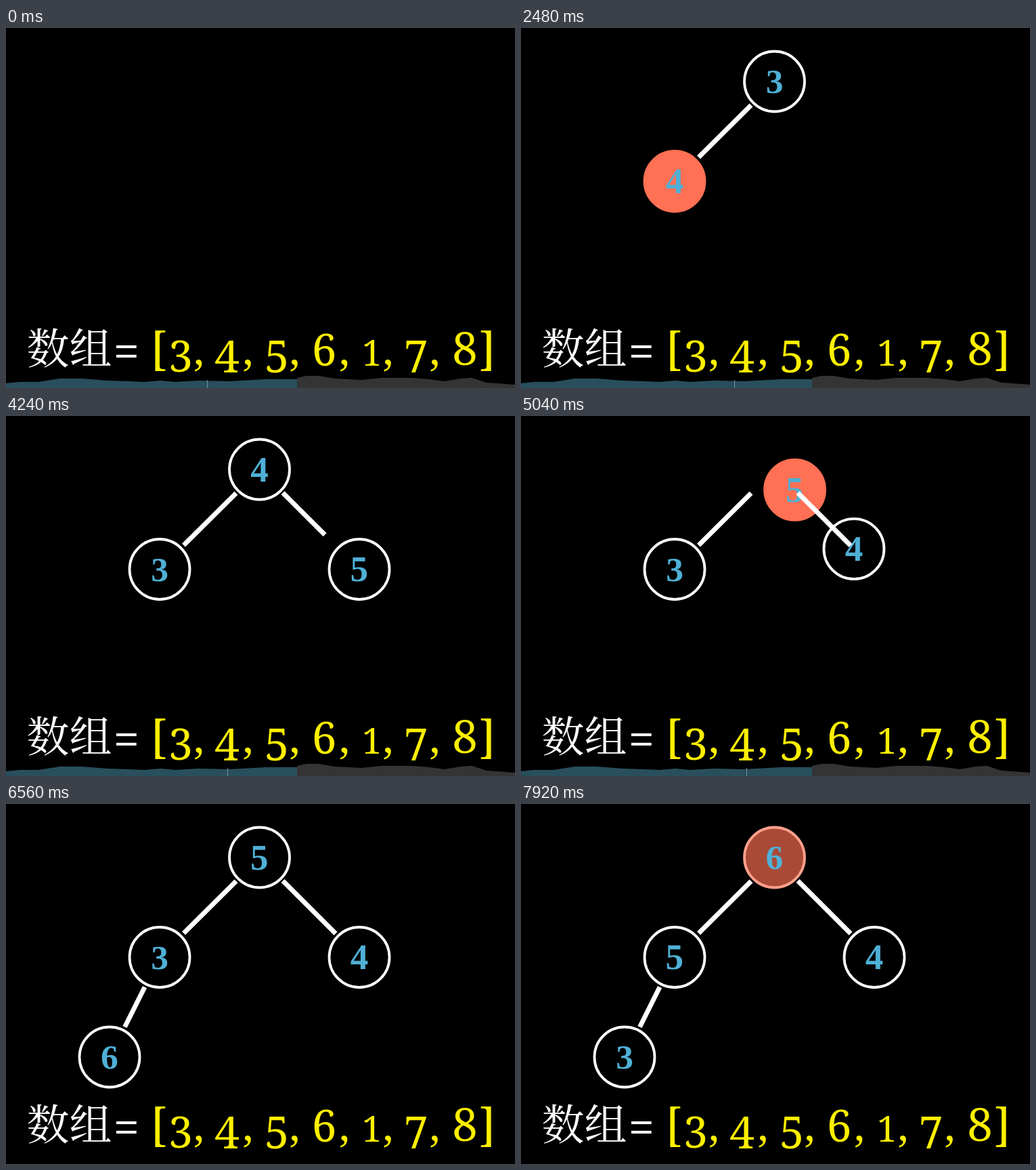
Animation, 752 px wide and 532 px high, one loop 8000 ms. Source, as an HTML page with a canvas:

```html
<!DOCTYPE html>
<html lang="zh">
<head>
<meta charset="utf-8">
<title>Heap insertion</title>
<style>
html, body { margin: 0; width: 100%; height: 100%; overflow: hidden; background: #000; }
canvas { display: block; }
</style>
</head>
<body>
<canvas id="stage" width="752" height="532"></canvas>
<script>
const ctx = document.getElementById('stage').getContext('2d');

const LOOP = 8000, TICK = 80;
const START = 871, STEP = 800 / 3;      // every action takes one step
const BAR_END = 6480;

const SERIF = '"Noto Serif", serif';
const NODE_FONT = '"Liberation Serif", "Times New Roman", serif';
const CJK = '"Noto Serif CJK SC", "Noto Sans CJK SC", "Noto Sans CJK", sans-serif';
const YELLOW = '#fff000', BLUE = '#4fb0d6';

const ROOT = [374.5, 79], LEFT = [227, 226.5], RIGHT = [522, 226.5], LEAF = [153, 374];

// from: place in the array; moves: [step, destination]; red: [step on, step off]
const nodes = [
  { digit: '3', from: [259, 485], home: ROOT, insert: 0, moves: [[7, LEFT], [24, LEAF]] },
  { digit: '4', from: [327, 485], home: LEFT, insert: 2, moves: [[7, ROOT], [15, RIGHT]], red: [5, 8] },
  { digit: '5', from: [400, 486], home: RIGHT, insert: 11, moves: [[15, ROOT], [25, LEFT]], red: [14, 16] },
  { digit: '6', from: [471, 476], home: LEAF, insert: 19, moves: [[24, LEFT], [25, ROOT]], red: [22, 26] },
];

const edges = [
  { step: 3, a: [340, 114], b: [262.5, 191] },
  { step: 12, a: [409, 113.5], b: [487, 191.5] },
  { step: 20, a: [205, 270.5], b: [175.5, 329.5] },
];

// character, ink centre x, ink top, ink bottom
const arrayText = [
  ['[', 228, 448, 508], ['3', 258, 461, 508.5], ['4', 326.5, 461, 508.5],
  ['5', 399.5, 462, 510], ['6', 470.5, 451, 499.5], ['1', 540, 461, 499],
  ['7', 606, 461, 508.5], ['8', 678, 449.5, 499], [']', 709, 448, 508],
];
const commas = [284.5, 357, 426, 499.5, 564, 633];

const lerp = (a, b, p) => a + (b - a) * p;
const lerpPoint = (a, b, p) => [lerp(a[0], b[0], p), lerp(a[1], b[1], p)];
const sigmoid = x => 1 / (1 + Math.exp(-x));

function smooth(x) {
  const low = sigmoid(-5);
  const p = Math.max(0, Math.min(1, x));
  return (sigmoid(10 * (p - 0.5)) - low) / (1 - 2 * low);
}

const progress = (time, step) => smooth((time - START) / STEP - step);

// Draws one character at the size that fills the given ink height.
function drawInk(char, x, top, bottom, family, weight = 400) {
  ctx.font = `${weight} 100px ${family}`;
  const probe = ctx.measureText(char);
  const size = 100 * (bottom - top) / (probe.actualBoundingBoxAscent + probe.actualBoundingBoxDescent);
  const k = size / 100;
  ctx.font = `${weight} ${size}px ${family}`;
  ctx.fillText(char,
    x - k * (probe.actualBoundingBoxRight - probe.actualBoundingBoxLeft) / 2,
    bottom - k * probe.actualBoundingBoxDescent);
}

function drawArray() {
  ctx.fillStyle = '#fff';
  ctx.font = `200 63px ${CJK}`;
  ctx.fillText('数', 30.5, 496);
  ctx.fillText('组', 93.5, 496);
  drawInk('=', 178, 469, 487, SERIF);
  ctx.fillStyle = YELLOW;
  for (const [char, x, top, bottom] of arrayText) drawInk(char, x, top, bottom, SERIF);
  for (const x of commas) drawInk(',', x, 490, 508, SERIF);
}

// Uneven blob (p = 0) growing into a circle (p = 1).
function traceBlob(x, y, p) {
  ctx.beginPath();
  for (let i = 0; i < 60; i++) {
    const a = i * Math.PI / 30;
    const seed = -6 + 9 * Math.sin(a) + 14 * Math.cos(2 * a - 0.3)
      + 6 * Math.cos(3 * a) - 6 * Math.cos(4 * a);
    const r = lerp(seed, 44.5, p);
    ctx.lineTo(x + r * Math.cos(a), y + r * Math.sin(a));
  }
  ctx.closePath();
}

function drawNode(node, time) {
  const p = progress(time, node.insert);
  if (p <= 0) return;

  let pos = lerpPoint(node.from, node.home, p);
  for (const [step, target] of node.moves) pos = lerpPoint(pos, target, progress(time, step));
  const red = node.red ? progress(time, node.red[0]) - progress(time, node.red[1]) : 0;
  const [x, y] = pos;

  if (p < 1) {
    traceBlob(x, y, p);
    ctx.fillStyle = `rgba(255,240,0,${1 - p})`;
    ctx.strokeStyle = `rgb(255,255,${255 * p})`;
  } else {
    ctx.beginPath();
    ctx.arc(x, y, 44.5, 0, 2 * Math.PI);
    ctx.fillStyle = `rgba(255,112,84,${red})`;
    ctx.strokeStyle = `rgb(255,${lerp(255, 112, red)},${lerp(255, 84, red)})`;
  }
  ctx.fill();
  ctx.lineWidth = 3.8 * p;
  ctx.stroke();

  ctx.globalAlpha = p * p;
  ctx.fillStyle = BLUE;
  drawInk(node.digit, x, y + 1 - 17.5 * p, y + 1 + 17.5 * p, NODE_FONT, 700);
  ctx.globalAlpha = 1;
}

function drawEdge({ step, a, b }, time) {
  const p = progress(time, step);
  if (p <= 0) return;
  ctx.beginPath();
  ctx.moveTo(...a);
  ctx.lineTo(...lerpPoint(a, b, p));
  ctx.lineWidth = 7;
  ctx.strokeStyle = '#fff';
  ctx.stroke();
}

function drawStrip(points, color) {
  ctx.beginPath();
  ctx.moveTo(points[0][0], 532);
  for (const [x, y] of points) ctx.lineTo(x, y);
  ctx.lineTo(points[points.length - 1][0], 532);
  ctx.fillStyle = color;
  ctx.fill();
}

function drawBar(time) {
  drawStrip([[0, 525], [20, 523], [48, 523], [80, 518], [112, 518], [150, 521], [180, 522],
    [205, 523], [228, 521], [250, 523], [285, 521], [330, 522], [385, 519], [430, 519]], '#294f5c');
  drawStrip([[430, 517], [444, 514], [462, 514], [485, 518], [525, 520], [555, 517], [600, 517],
    [625, 519], [648, 522], [672, 518], [688, 517], [710, 524], [752, 527]], '#343434');
  ctx.fillStyle = '#72939d';
  ctx.fillRect(Math.round(297 + time * 0.00714), 520, 1, 12);
}

function draw(now) {
  const time = Math.floor((now % LOOP) / TICK) * TICK;
  ctx.fillStyle = '#000';
  ctx.fillRect(0, 0, 752, 532);
  if (time < BAR_END) drawBar(time);
  drawArray();
  for (const node of nodes) drawNode(node, time);
  for (const edge of edges) drawEdge(edge, time);
}

const begin = performance.now();
function loop() {
  draw(performance.now() - begin);
  requestAnimationFrame(loop);
}
loop();
</script>
</body>
</html>
```
